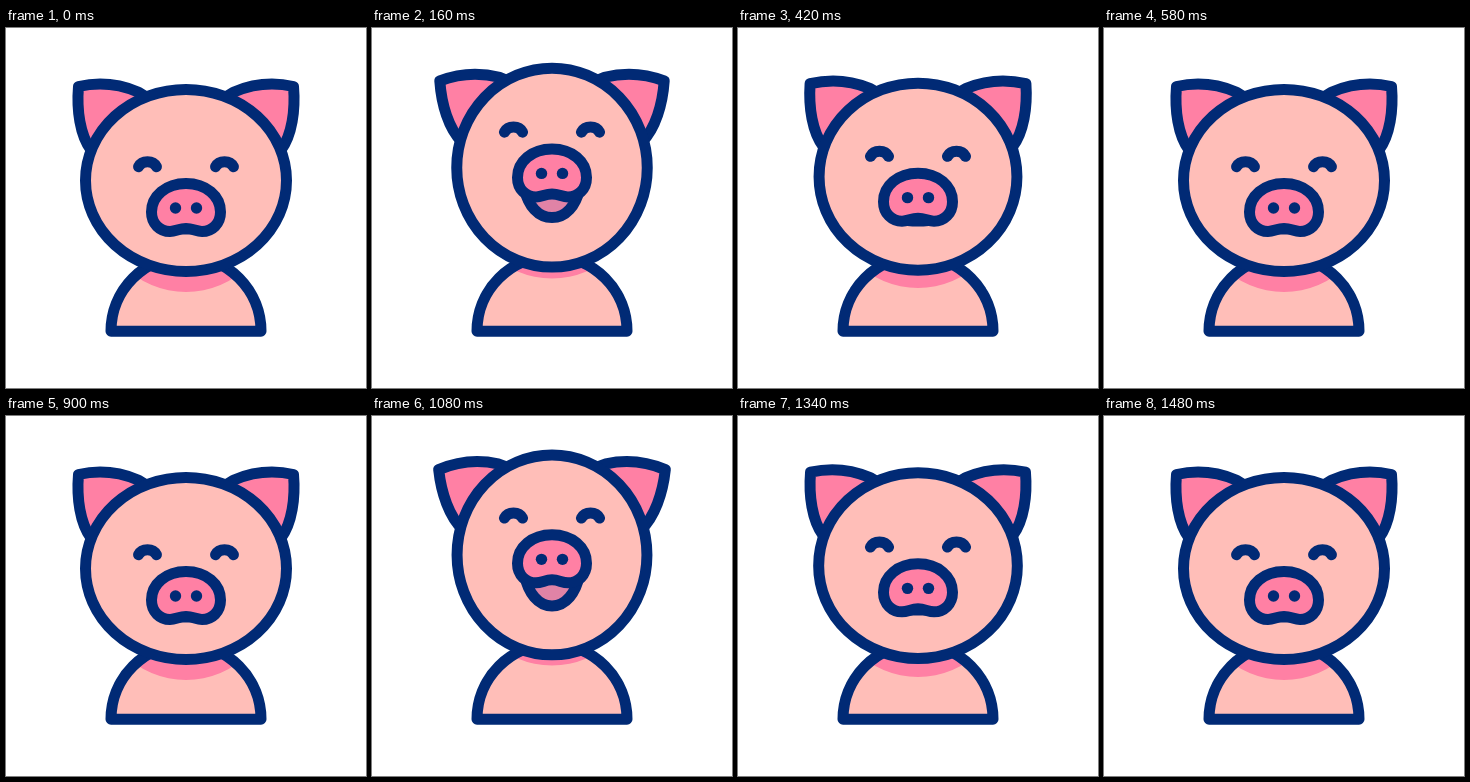
Animation, 360 px wide and 360 px high, one loop 1.8 s. Source, as an HTML page:

```html
<!DOCTYPE html>
<html lang="en">
<head>
<meta charset="utf-8">
<title>Laughing pig</title>
<style>
  html, body { margin: 0; width: 100%; height: 100%; overflow: hidden; background: #fff; }
  svg { display: block; width: 100vw; height: 100vh; }
  .line { stroke: #012a75; stroke-width: 11; stroke-linecap: round; stroke-linejoin: round; }
  .skin { fill: #ffbeb8; }
  .rose { fill: #ff80a4; }
</style>
</head>
<body>
<svg viewBox="0 0 360 360">
  <defs>
    <path id="dome" d="M105 303.2A75 75 0 0 1 255 303.2Z"/>
    <clipPath id="inside"><use href="#dome"/></clipPath>
    <path id="ear" d="M98 138L85 122C74 107 70.5 82 72.5 58.5C93 54 112 55.5 132 64L150 75Z"/>
    <path id="eye" d="M132.5 138.7C136 132 147 132 150.5 138.7"/>
  </defs>

  <use href="#dome" class="skin"/>
  <g clip-path="url(#inside)"><ellipse id="shade" class="rose" cx="180" rx="90" ry="92"/></g>
  <use href="#dome" class="line" fill="none"/>

  <g class="line rose">
    <use id="earL" href="#ear"/>
    <g transform="translate(360 0) scale(-1 1)"><use id="earR" href="#ear"/></g>
  </g>
  <ellipse id="head" class="line skin" cx="180"/>

  <g id="face">
    <g class="line" fill="none">
      <use href="#eye"/>
      <use href="#eye" x="77"/>
    </g>
    <path id="mouth" class="line" fill="#e083a6"/>
    <path class="line rose" d="M180 155.5C200 155.5 214.5 168 214.5 184C214.5 196 206 203.5 196 203.5C190 203.5 187 200.5 180 200.5C173 200.5 170 203.5 164 203.5C154 203.5 145.5 196 145.5 184C145.5 168 160 155.5 180 155.5Z"/>
    <g fill="#012a75">
      <circle cx="169.5" cy="180" r="5.7"/>
      <circle cx="190.5" cy="180" r="5.7"/>
    </g>
  </g>
</svg>
<script>
  const PERIOD = 900;
  const el = id => document.getElementById(id);
  const set = (id, attrs) => {
    for (const key in attrs) el(id).setAttribute(key, attrs[key]);
  };

  const ease = (t, from, to) => {
    const u = Math.min(1, Math.max(0, (t - from) / (to - from)));
    return u * u * (3 - 2 * u);
  };
  const pulse = (t, start, peak, end) => t < peak ? ease(t, start, peak) : 1 - ease(t, peak, end);

  function draw(t) {
    const lift = pulse(t, 0, 190, 545);
    const open = pulse(t, 0, 215, 465);
    const flap = pulse(t, 50, 250, 450); // ears trail the head

    set('head', { cy: 152.5 - 13.7 * lift, rx: 100.5 - 5.6 * lift, ry: 91 + 9 * lift });
    set('shade', { cy: 172 - 14.5 * lift });
    set('face', { transform: `translate(0 ${-36.9 * lift})` });

    const ear = `translate(${0.5 * lift} ${-11.7 * lift}) rotate(${-15 * flap} 105 95)`;
    set('earL', { transform: ear });
    set('earR', { transform: ear });

    const mid = 199 + 15 * open;
    const low = 201 + 27.5 * open;
    set('mouth', { d: `M153 197C156 ${mid} 166 ${low} 180 ${low}S204 ${mid} 207 197Z` });
  }

  function tick() {
    draw(performance.now() % PERIOD);
    requestAnimationFrame(tick);
  }
  tick();
</script>
</body>
</html>
```
